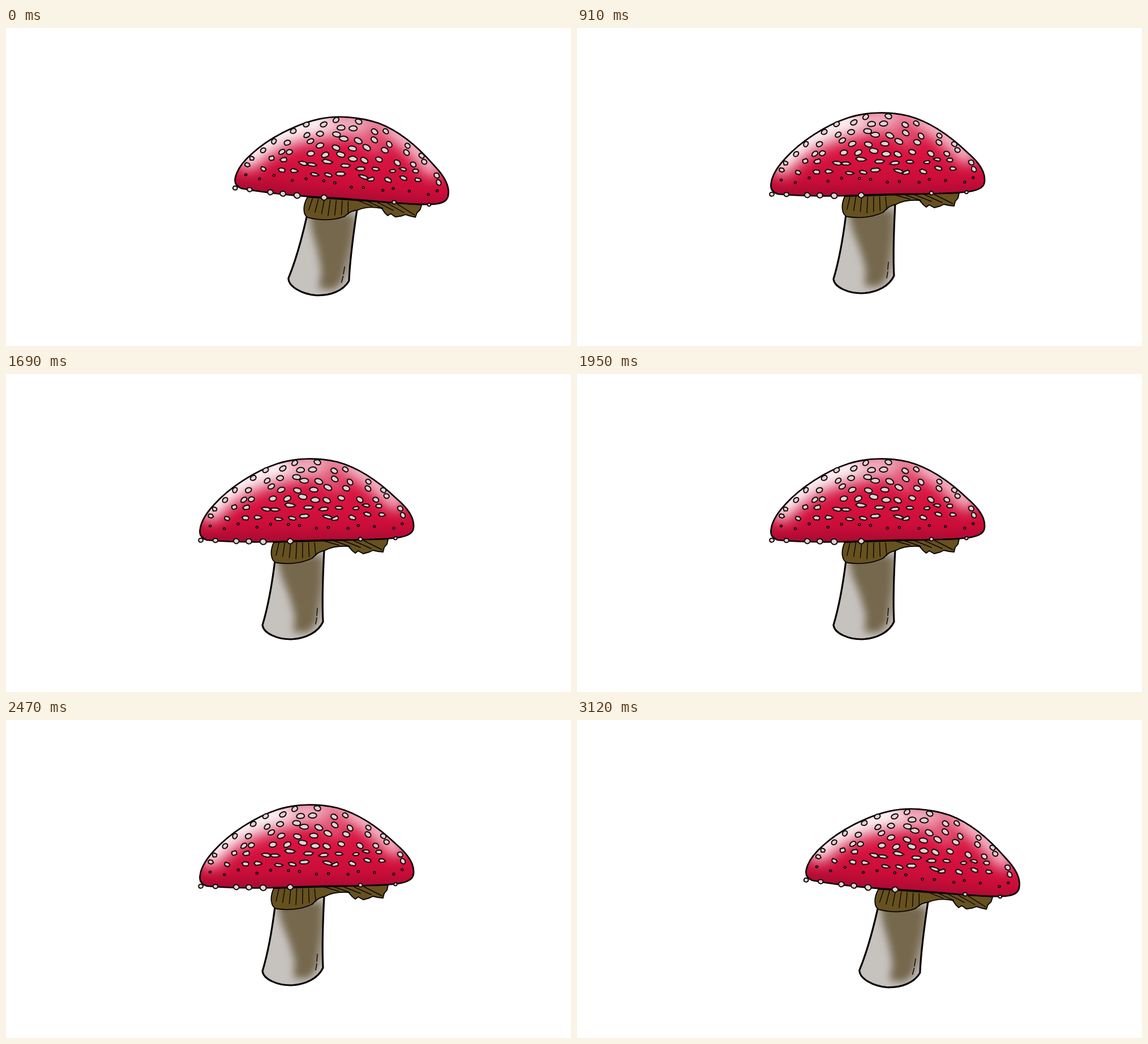
Recreate the animation shown at these times as an HTML page. Size 998 px wide and 561 px high, loop 3250 ms.

```html
<!DOCTYPE html>
<html>
<head>
<meta charset="utf-8">
<style>
  html, body { margin: 0; height: 100%; overflow: hidden; background: #fff; }
  svg { display: block; width: 100vw; height: 100vh; }
  .ink { fill: none; stroke: #080405; stroke-width: 2.7; stroke-linecap: round; stroke-linejoin: round; }
  .fine { stroke-width: 1.4; }
  #spots { fill: #ddd4d2; stroke: #14060a; stroke-width: 2; stroke-linejoin: round; }
</style>
</head>
<body>
<svg viewBox="0 0 998 561">
  <defs>
    <path id="cap" d="M343 273C345 260 352 247 368 230C395 200 440 171 480 158C510 148 550 147 585 155C630 167 665 196 690 220C710 237 720 253 720 267C721 280 712 286 690 289C640 295 560 291 502 295C450 297 400 297 355 293C345 290 341 283 343 273Z"/>
    <path id="stem" d="M475 330C470 370 463 410 453 443C455 458 480 468 503 468C530 467 552 455 560 437C558 400 560 350 562 311L530 318Z"/>
    <path id="skirt" d="M473 297C466 312 467 330 478 333C500 336 522 334 541 325C549 316 554 313 564 311C576 304 590 303 605 304L612 312L617 316L622 312L631 317L642 314L648 311L657 313L666 314L668 306L673 300L675 291Z"/>
    <clipPath id="inCap"><use href="#cap"/></clipPath>
    <clipPath id="inStem"><use href="#stem"/></clipPath>
    <linearGradient id="red" x2="0" y2="1">
      <stop offset=".55" stop-color="#d7123f"/>
      <stop offset=".8" stop-color="#cb0d39"/>
      <stop offset="1" stop-color="#a90b32"/>
    </linearGradient>
    <filter id="soft" x="-60%" y="-60%" width="220%" height="220%"><feGaussianBlur stdDeviation="12"/></filter>
    <filter id="smooth" x="-40%" y="-40%" width="180%" height="180%"><feGaussianBlur stdDeviation="7"/></filter>
  </defs>
  <g id="mushroom">
    <use href="#stem" fill="#c6c2be"/>
    <g clip-path="url(#inStem)">
      <g filter="url(#smooth)">
        <path fill="#75674d" d="M478 320H560L554 400L549 440L535 456H508L510 425L500 390L486 355Z"/>
        <path fill="#9b8f7b" d="M556 330H575V430H558Z"/>
      </g>
    </g>
    <use href="#stem" class="ink" style="stroke-width:3.2"/>
    <path class="ink fine" d="M550 413L549 426M549 430L547 441"/>
    <use href="#skirt" fill="#66511f"/>
    <use href="#skirt" class="ink" style="stroke-width:1.9"/>
    <path id="gills" class="ink fine"/>
    <use href="#cap" fill="url(#red)"/>
    <g clip-path="url(#inCap)">
      <g filter="url(#soft)" fill="none" stroke-linecap="round">
        <path stroke="#efb0c0" stroke-width="44" d="M362 238C395 200 440 178 545 160"/>
        <path stroke="#fff" stroke-width="32" d="M360 232C390 196 430 174 485 158"/>
        <path stroke="#eda9ba" stroke-width="24" d="M545 150L590 156"/>
        <path stroke="#f4c3cf" stroke-width="34" d="M610 163C645 180 665 200 688 222"/>
        <path stroke="#ef9bb0" stroke-width="14" d="M560 184L590 198"/>
      </g>
    </g>
    <use href="#cap" class="ink"/>
    <g id="spots"></g>
  </g>
</svg>
<script>
const STEP = 130, STEPS = 25;
const POSES = ["rotate(5.5 489 919)", "", "translate(4 8) rotate(-5 489 919)", ""];

let seed = 7;
const random = () => (seed = seed * 16807 % 2147483647) / 2147483647;
const jitter = amount => (random() * 2 - 1) * amount;

// Uneven oval; a jagged one has straight edges and pointed ends.
function addSpot(x, y, rx, ry, angle = 0, jagged = false) {
  const count = jagged ? 6 : 8;
  const points = Array.from({ length: count }, (_, i) => {
    const a = i * 2 * Math.PI / count, k = 1 + jitter(jagged ? 0.3 : 0.1);
    return [Math.cos(a) * rx * k, Math.sin(a) * ry * k];
  });
  const middle = (p, q) => `${(p[0] + q[0]) / 2} ${(p[1] + q[1]) / 2}`;
  const d = jagged
    ? "M" + points.join("L") + "Z"
    : "M" + middle(points.at(-1), points[0]) +
      points.map((p, i) => `Q${p} ${middle(p, points[(i + 1) % count])}`).join("") + "Z";
  const path = document.createElementNS("http://www.w3.org/2000/svg", "path");
  path.setAttribute("d", d);
  path.setAttribute("transform", `translate(${x} ${y}) rotate(${angle})`);
  document.getElementById("spots").append(path);
}

// Half the width of the cap at a given height.
const halfWidth = y => 186 * Math.sin(Math.PI / 2 * ((y - 149) / 136) ** 0.65);

// Rows of warts: round on top, ragged lower down, dots near the rim.
for (let row = 0; row < 8; row++) {
  const y = 153 + row * 16.5;
  const width = halfWidth(y), count = Math.round(width * 2 / 27);
  for (let i = 0; i < count; i++) {
    const u = (i + 0.5 + jitter(0.28)) / count * 2 - 1;
    const x = 533 + u * width, top = y + jitter(4.5);
    const size = 1 - Math.abs(u);
    if (row === 7) addSpot(x, top, 2, 1.7);
    else if (row > 4 && u < 0.75) addSpot(x, top, 4.5 + size * 4.5, 3.4, jitter(22), true);
    else addSpot(x, top, 5.2 + size * 3, 4.2 + size * 0.6, u * 45 + jitter(18));
  }
}

// Warts hanging from the lower edge.
for (const x of [344, 370, 407, 429, 454, 502, 626, 688]) {
  const size = 6 - Math.abs(x - 470) / 75;
  addSpot(x, 296 - Math.abs(x - 454) * 0.027, size, size * 0.9);
}

// Pleats of the skirt, then the slanted gills to its right.
let gills = "";
for (let i = 0; i < 7; i++) gills += `M${482 + i * 10.5} 298l${i * 1.2 - 5} ${28 - Math.abs(i - 3) * 2}`;
for (let i = 0; i < 5; i++) gills += `M${560 + i * 18} 294l${28 + i} ${8 + i * 2}`;
document.getElementById("gills").setAttribute("d", gills);

const mushroom = document.getElementById("mushroom");
function draw() {
  const step = Math.floor(performance.now() / STEP) % STEPS;
  mushroom.setAttribute("transform", POSES[step % POSES.length]);
  requestAnimationFrame(draw);
}
draw();
</script>
</body>
</html>
```
